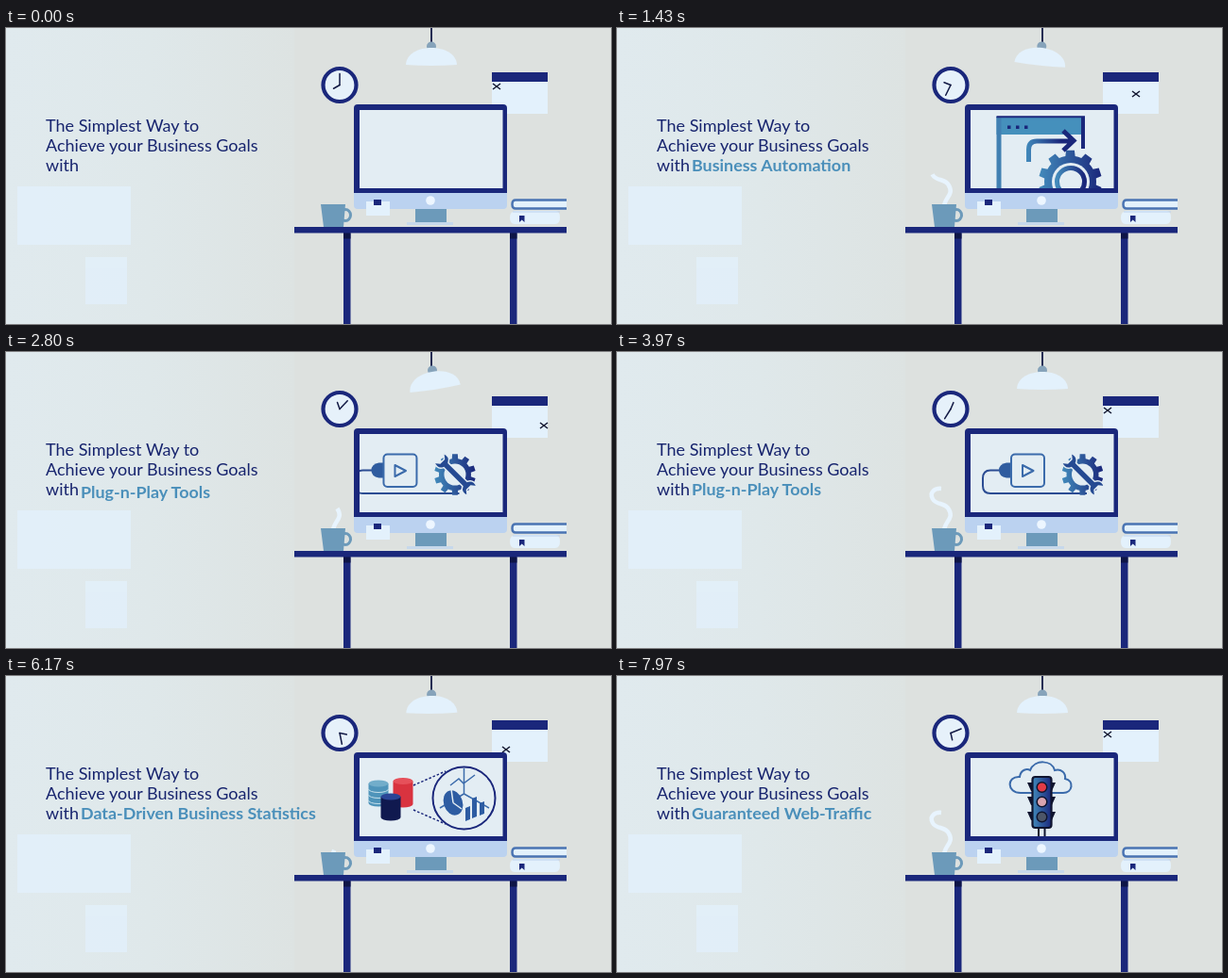
Write an HTML page that moves like this. It is 640 by 314 pixels and loops after 8000 ms.

```html
<!DOCTYPE html>
<html lang="en">
<head>
<meta charset="utf-8">
<title>Business goals</title>
<style>
  html, body { margin: 0; width: 100%; height: 100%; overflow: hidden; background: #dde1df; }
  svg { display: block; width: 100%; height: 100%; }
  text { font-family: Lato, "Open Sans", sans-serif; font-size: 18px; fill: #17246e; }
  .term { font-size: 17.9px; font-weight: 700; fill: #4a8fba; }
  .navy { fill: #1a277b; }
  .pale { fill: #e3f1fc; }
  .steel { fill: #6c9aba; }
  .line { fill: none; stroke: #1a277b; stroke-width: 2; }
  .blueline { fill: none; stroke: #3b6bab; stroke-width: 2; }
</style>
</head>
<body>
<svg viewBox="0 0 640 314" preserveAspectRatio="none">
  <defs>
    <linearGradient id="wall">
      <stop offset="0" stop-color="#e0eaee"/><stop offset=".5" stop-color="#dfe8ea"/><stop offset="1" stop-color="#dde3e2"/>
    </linearGradient>
    <linearGradient id="deep">
      <stop offset="0" stop-color="#428abb"/><stop offset="1" stop-color="#1a277b"/>
    </linearGradient>
    <linearGradient id="arrow" gradientUnits="userSpaceOnUse" x1="433" y1="0" x2="482" y2="0">
      <stop offset="0" stop-color="#428abb"/><stop offset=".75" stop-color="#1a277b"/>
    </linearGradient>
    <clipPath id="screen"><rect x="374" y="87" width="151.500" height="83"/></clipPath>
    <clipPath id="slot"><rect x="70" y="135" width="280" height="23"/></clipPath>
    <clipPath id="picture"><rect x="305" width="288" height="314"/></clipPath>
  </defs>

  <rect width="640" height="314" fill="#dde1df"/>
  <rect width="305" height="314" fill="url(#wall)"/>
  <g class="pale" opacity=".8">
    <rect x="12" y="168" width="120" height="62"/>
    <rect x="84" y="243" width="44" height="50"/>
  </g>

  <text x="42" y="110">The Simplest Way to</text>
  <text x="42" y="131">Achieve your Business Goals</text>
  <text x="42" y="152">with</text>
  <g clip-path="url(#slot)"><text id="term" class="term" x="79" y="152"></text></g>

  <g clip-path="url(#picture)">
    <path d="M450 0V16" stroke="#131a45" stroke-width="1.800"/>
    <g id="lamp">
      <circle cx="450" cy="19.500" r="5" fill="#86a3ba"/>
      <path class="pale" d="M423 39C424 15 476 15 477 39Q450 41 423 39Z"/>
    </g>

    <circle cx="353" cy="60.500" r="17.500" fill="#e6f1fa" stroke="#1a277b" stroke-width="4.200"/>
    <g stroke="#131a45" stroke-width="1.500" stroke-linecap="round">
      <path id="hour" d="M353 60.500V53"/>
      <path id="minute" d="M353 60.500V48.500"/>
    </g>

    <rect class="pale" x="514" y="57" width="59" height="34"/>
    <rect class="navy" x="514" y="47" width="59" height="10"/>
    <path id="mark" d="M-4 -3L4 3M-4 3L4 -3" stroke="#10142e" stroke-width="1.500"/>

    <rect class="navy" x="368" y="81" width="162" height="98" rx="4"/>
    <path d="M368 175H530V188Q530 192 526 192H372Q368 192 368 188Z" fill="#bbd2f0"/>
    <rect x="374" y="87" width="151.500" height="83" fill="#e3edf3"/>
    <circle cx="449" cy="183" r="4.800" fill="#edf6ff"/>
    <rect class="steel" x="433" y="192" width="33" height="14"/>
    <rect x="424" y="206" width="49" height="3" fill="#c6d8eb"/>
    <rect class="pale" x="381" y="184" width="25" height="15"/>
    <rect class="navy" x="389" y="182" width="8" height="6"/>

    <path id="steam" d="M346 190C346 180 357 177 351 167C347 159 338 163 334 156C330 149 336 144 344 145"
      fill="none" stroke="#e8f4fe" stroke-width="4.500" pathLength="100"/>
    <ellipse cx="359" cy="198.500" rx="5.500" ry="6" fill="none" stroke="#6c9aba" stroke-width="3"/>
    <path class="steel" d="M333 187H359L357 211H336Z"/>

    <path d="M594 182.500H539Q535.500 182.500 535.500 187Q535.500 191.500 539 191.500H594" class="pale"
      stroke="#4a74b3" stroke-width="2.500"/>
    <path d="M540 194H581Q586 194 586 201Q586 208 581 208H538Q533 208 533 201Q533 194 540 194Z" class="pale"/>
    <path d="M536 195H586" stroke="#bbd2f0"/>
    <path class="navy" d="M543 199H548.500V206L545.700 203.500L543 206Z"/>

    <g class="navy">
      <rect x="305" y="211" width="288" height="6.500"/>
      <rect x="357" y="217" width="7.500" height="97"/>
      <rect x="533" y="217" width="7.500" height="97"/>
    </g>
    <path d="M357 217.500h7.500v6h-7.500zM533 217.500h7.500v6h-7.500z" fill="#0e1546"/>
  </g>

  <g clip-path="url(#screen)">
    <g class="scene">
      <rect x="401.500" y="94" width="93" height="19" fill="#4590bc"/>
      <path d="M404 172V94" stroke="#4180b2" stroke-width="5"/>
      <path d="M401.500 94.200H495" class="line"/>
      <path d="M493 94V128" class="line" style="stroke-width:4"/>
      <path class="navy" d="M413 103.500h3.500v3.500h-3.500zM422 103.500h3.500v3.500h-3.500zM431 103.500h3.500v3.500h-3.500z"/>
      <path d="M435.500 142V129Q435.500 120 444 120H482M472 109L483 119.500L472 130"
        fill="none" stroke="url(#arrow)" stroke-width="5"/>
      <path class="gear" data-gear="479.500 163 10 27.500 33.500" fill="url(#deep)"/>
      <circle cx="480" cy="163" r="20" fill="#e3edf3"/>
      <circle cx="480" cy="163" r="14.500" fill="none" stroke="url(#deep)" stroke-width="5"/>
    </g>

    <g class="scene">
      <path class="line" style="stroke:#2b4c93" d="M406 125.500H395Q387 125.500 387 134V142Q387 150 395 150H497"/>
      <path d="M417 117.500V133.500H412Q404 132 404 125.500Q404 119 412 117.500Z" fill="#2f5c9f"/>
      <rect class="blueline" x="417" y="108.500" width="35" height="34.500" rx="4"/>
      <path class="blueline" stroke-linejoin="round" d="M429 120L440.500 126L429 132Z"/>
      <path class="gear" data-gear="492.500 130 10 17 22" fill="url(#deep)"/>
      <circle cx="492.500" cy="130" r="11.500" fill="#e3edf3"/>
      <path transform="translate(493 130) rotate(45)" fill="#254a92" stroke="#e3edf3" stroke-width="1.500"
        d="M-14 -3.500H14C16 -8 20 -9 25 -7L20 -3V3L25 7C20 9 16 8 14 3.500H-14C-16 8 -20 9 -25 7L-20 3V-3L-25 -7C-20 -9 -16 -8 -14 -3.500Z"/>
    </g>

    <g class="scene">
      <g id="drums"></g>
      <path class="line" style="stroke-width:1.500" stroke-dasharray="2.500 2" d="M431 116L465 101M431 142L465 157"/>
      <circle class="line" cx="484.500" cy="129.500" r="33" style="fill:#e3edf3"/>
      <path class="blueline" style="stroke-width:1.500" d="M484.500 98V125L459 140M484.500 125L511 140M470 116L479 109L484 114L496 105"/>
      <ellipse cx="473" cy="134.500" rx="10" ry="13.500" fill="#2d5ca2" transform="rotate(-18 473 134.500)"/>
      <path d="M473 134.500L471 120M473 134.500L482 141" stroke="#e3edf3" stroke-width="1.500"/>
      <path fill="#2d5ca2" d="M486 140l5 -2v14l-5 2zM493 130l5 -2v21l-5 2zM501 135l5 -2v13l-5 2z"/>
    </g>

    <g class="scene">
      <path class="blueline" d="M427 124C412 124 412 106 426 107C427 99 434 98 437 100C442 88 460 89 463 100C470 98 475 103 474 109C484 111 482 124 472 124Z"/>
      <path d="M434 113h30l-4 9h-22zM434 128h30l-4 9h-22zM434 144h30l-4 9h-22z" fill="#10152f"/>
      <rect x="446" y="160" width="6.500" height="12" fill="#e3edf3" stroke="#10152f" stroke-width="2"/>
      <rect x="439.500" y="107" width="20" height="54" rx="3" fill="url(#deep)" stroke="#10152f" stroke-width="2.200"/>
      <g stroke="#10152f" stroke-width="1.500">
        <circle cx="449.500" cy="118" r="5.300" fill="#e23b45"/>
        <circle cx="449.500" cy="133.500" r="5.300" fill="#d9a5b0"/>
        <circle cx="449.500" cy="149.500" r="5.300" fill="#4d5668"/>
      </g>
    </g>
  </g>
</svg>
<script>
const LOOP = 8000, SCENE = 2500, ENTER = 450, LEAVE = 2100;
const TERMS = ["Business Automation", "Plug-n-Play Tools",
  "Data-Driven Business Statistics", "Guaranteed Web-Traffic"];
const $ = id => document.getElementById(id);
const scenes = [...document.querySelectorAll(".scene")];
const clamp = v => Math.min(1, Math.max(0, v));
const easeInOut = p => (1 - Math.cos(Math.PI * p)) / 2;
const move = (node, x, y) => node.setAttribute("transform", `translate(${x} ${y})`);
const spin = (id, angle, x, y) => $(id).setAttribute("transform", `rotate(${angle} ${x} ${y})`);

function gearPath(cx, cy, teeth, inner, outer) {
  const step = 2 * Math.PI / teeth, points = [];
  for (let i = 0; i < teeth; i++) {
    for (const [part, r] of [[-.5, inner], [-.3, inner], [-.21, outer], [.21, outer], [.3, inner]]) {
      const a = (i + part) * step;
      points.push((cx + r * Math.sin(a)).toFixed(2) + " " + (cy - r * Math.cos(a)).toFixed(2));
    }
  }
  return "M" + points.join("L") + "Z";
}

function drum(x, top, bottom, side, lid, bands = "") {
  const rim = y => `M${x - 10.5} ${y}a10.5 3.5 0 0 0 21 0`;
  const stripes = bands && [6, 12, 18].map(d => `<path d="${rim(top + d)}" fill="none" stroke="${bands}"/>`).join("");
  return `<path d="${rim(bottom)}V${top}h-21Z" fill="${side}"/>${stripes}
    <ellipse cx="${x}" cy="${top}" rx="10.5" ry="3.5" fill="${lid}"/>`;
}

document.querySelectorAll(".gear").forEach(g =>
  g.setAttribute("d", gearPath(...g.dataset.gear.split(" ").map(Number))));
$("drums").innerHTML =
  drum(394, 114, 135, "#4f94ba", "#72adca", "#c5dfeb") +
  drum(420, 111.5, 136, "#d9333f", "#e6505a") +
  drum(407, 128, 150, "#10194f", "#2a4596");

// The shade swings to one side, back, to the other and back, a second each.
function sway(t) {
  const quarter = Math.floor(t / 1000) % 4, p = easeInOut(t % 1000 / 1000);
  return 10 * [p, 1 - p, -p, p - 1][quarter];
}

function render(t) {
  const index = Math.floor(t / SCENE), local = t % SCENE;
  const before = (1 - clamp(local / ENTER)) ** 2;
  const after = clamp((local - LEAVE) / (SCENE - LEAVE)) ** 2;
  scenes.forEach((scene, i) => {
    scene.style.display = i === index ? "" : "none";
    move(scene, 160 * (after - before), 0);
  });
  $("term").textContent = TERMS[index];
  move($("term"), 0, 24 * (before + after));

  spin("minute", t * .144, 353, 60.5);
  spin("hour", 240 + t * .036, 353, 60.5);
  spin("lamp", sway(t), 450, 13);

  const day = Math.round(t * 6 / 1000) % 24;
  move($("mark"), 519 + day % 6 * 10, 62 + Math.floor(day / 6) * 8);
  $("steam").setAttribute("stroke-dasharray", `${t % 2000 / 20} 200`);
}

const start = performance.now();
function tick() {
  render((performance.now() - start) % LOOP);
  requestAnimationFrame(tick);
}
render(0);
requestAnimationFrame(tick);
</script>
</body>
</html>
```
